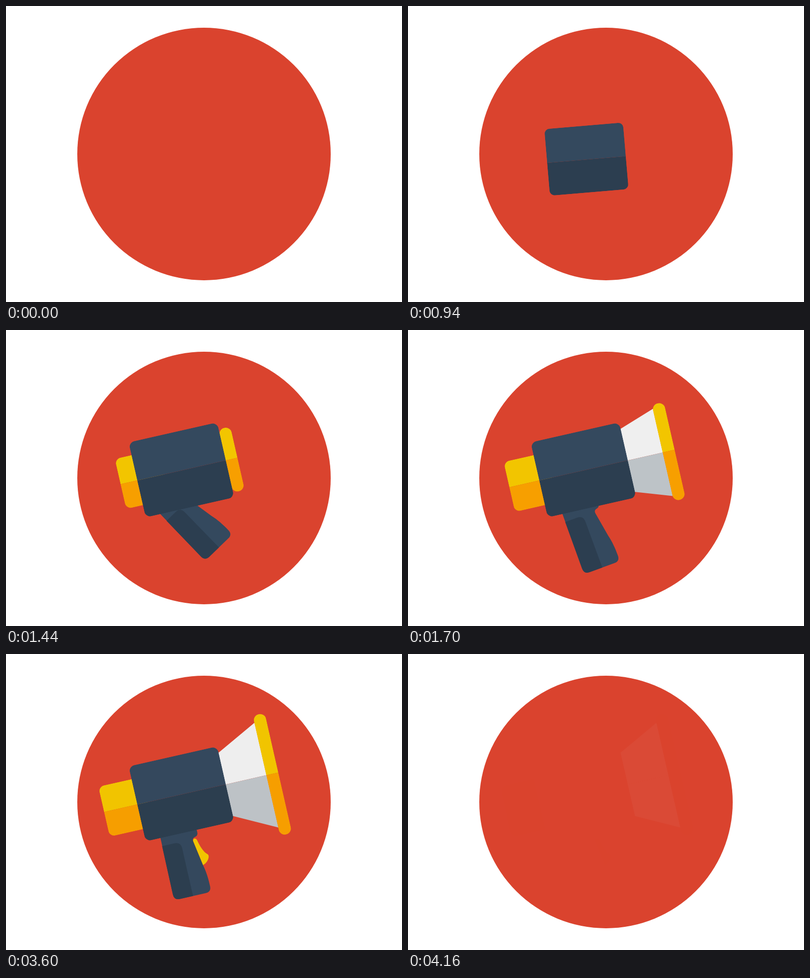
Write an HTML page with a canvas that moves like this. It is 800 px wide and 600 px high and loops after 4820 ms.

```html
<!DOCTYPE html>
<html lang="en">
<head>
<meta charset="utf-8">
<title>Megaphone</title>
<style>
  html, body { margin: 0; width: 100%; height: 100%; overflow: hidden; background: #fff; }
  canvas { display: block; width: 800px; height: 600px; }
</style>
</head>
<body>
<canvas id="stage" width="800" height="600"></canvas>
<script>
const LOOP = 4820, STEP = 20;
const APPEAR = 600, FADE_START = 3580, FADE_END = 4240, FADE_HOLD = 4160;
const RED = '#da432e';
const TILT = 12.8 * Math.PI / 180;
const CENTER = { x: 354.4, y: 283.6 };

const COLORS = {
  light: '#34495e', dark: '#2c3e50', yellow: '#f2c500',
  orange: '#f79f00', pale: '#efefef', grey: '#bdc3c7'
};
// Faint remainder of the fade: only the bright parts stay visible.
const GHOST = {
  light: RED, dark: RED, yellow: '#e05a20',
  orange: '#e05a20', pale: '#efefef', grey: '#efefef'
};

const stage = document.getElementById('stage').getContext('2d');
const layer = document.createElement('canvas');
layer.width = 800;
layer.height = 600;
const g = layer.getContext('2d');

const HANDLE = new Path2D('M-61 68 L-62 195 Q-62 207 -50 207 H3 Q15 207 15 195 ' +
  'C15 180 14 164 10.5 150.5 L1.8 99 Q1 93 6 91.5 Q14 90 14 84 V68 Z');
const GRIP = new Path2D('M-61.5 94.5 H-36 Q-23 94.5 -23 107.5 V207 H-50 Q-62 207 -62 195 Z');
const TRIGGER = new Path2D('M1.8 99 Q2 94 6 94 Q9 94.5 10 98 ' +
  'C13 112 17 124 24 130.5 Q27 133 25 138 Q21 147 10.5 150.5 Z');

const progress = (t, from, to) => Math.min(1, Math.max(0, (t - from) / (to - from)));
const smooth = u => u * u * (3 - 2 * u);
const softOut = u => 1 - (1 - u) ** 3 * (1 + 3 * u);
const quadOut = u => 1 - (1 - u) ** 2;

function fillPath(path, color) {
  g.fillStyle = color;
  g.fill(path);
}

function polygon(color, ...points) {
  g.beginPath();
  points.forEach(([x, y]) => g.lineTo(x, y));
  g.fillStyle = color;
  g.fill();
}

// Rounded block split into two tones at local y = 1.
function block(x, top, w, bottom, r, upper, lower) {
  g.save();
  g.beginPath();
  g.roundRect(x, top, w, bottom - top, r);
  g.clip();
  g.fillStyle = upper;
  g.fillRect(x, top, w, 1 - top);
  g.fillStyle = lower;
  g.fillRect(x, 1, w, bottom - 1);
  g.restore();
}

function drawHorn(t, c) {
  const slide = smooth(progress(t, 1211, 1814));
  const spread = smooth(progress(t, 1440, 1908));
  const x = 188 - 125 * (1 - slide);
  const edge = x - 12;
  if (edge > 91) {
    const top = -64 - 44 * spread, bottom = 66 + 44 * spread;
    polygon(c.pale, [90, -64], [edge, top], [edge, 1], [90, 1]);
    polygon(c.grey, [90, 1], [edge, 1], [edge, bottom], [90, 66]);
  }
  const half = 66 + 59 * spread;
  block(x - 12.5, 2 - half, 25, 2 + half, 12.5, c.yellow, c.orange);
}

function drawHandle(t, c) {
  const swing = 1 - quadOut(progress(t, 1065, 1945));
  g.save();
  g.translate(-58, 77.5);
  g.rotate(-95 * swing * Math.PI / 180);
  g.translate(58, -77.5);
  const pull = smooth(progress(t, 1660, 2100));
  if (pull > 0) {
    g.save();
    g.translate(-28 * (1 - pull), 0);
    fillPath(TRIGGER, c.yellow);
    g.restore();
  }
  fillPath(HANDLE, c.light);
  fillPath(GRIP, c.dark);
  g.restore();
}

function drawMegaphone(t, c) {
  const drop = 153 * (1 - softOut(progress(t, 580, 1180)));
  const scale = softOut(progress(t, 580, 1138));
  const turn = smooth(progress(t, 580, 1440));
  g.clearRect(0, 0, 800, 600);
  g.save();
  g.translate(CENTER.x + drop * Math.sin(TILT), CENTER.y + drop * Math.cos(TILT));
  g.rotate(-TILT * turn);
  g.scale(scale, scale);
  if (t > 1211) drawHorn(t, c);
  if (t > 990) {
    const hidden = 71 * (1 - smooth(progress(t, 990, 1867)));
    block(-160.5 + hidden, -51.5, 90, 52.5, 12, c.yellow, c.orange);
  }
  if (t > 1080) drawHandle(t, c);
  block(-91.8, -78, 183.6, 78, 12, c.light, c.dark);
  g.restore();
}

function draw(t) {
  stage.globalAlpha = 1;
  stage.fillStyle = '#fff';
  stage.fillRect(0, 0, 800, 600);
  stage.fillStyle = RED;
  stage.beginPath();
  stage.arc(400, 300, 256, 0, Math.PI * 2);
  stage.fill();
  if (t < APPEAR) return;
  drawMegaphone(t, t >= FADE_HOLD ? GHOST : COLORS);
  stage.globalAlpha = 1 - smooth(progress(Math.min(t, FADE_HOLD), FADE_START, FADE_END));
  stage.drawImage(layer, 0, 0);
}

const start = performance.now();
function tick() {
  const t = (performance.now() - start) % LOOP;
  draw(Math.floor(t / STEP) * STEP);
  requestAnimationFrame(tick);
}
tick();
</script>
</body>
</html>
```
